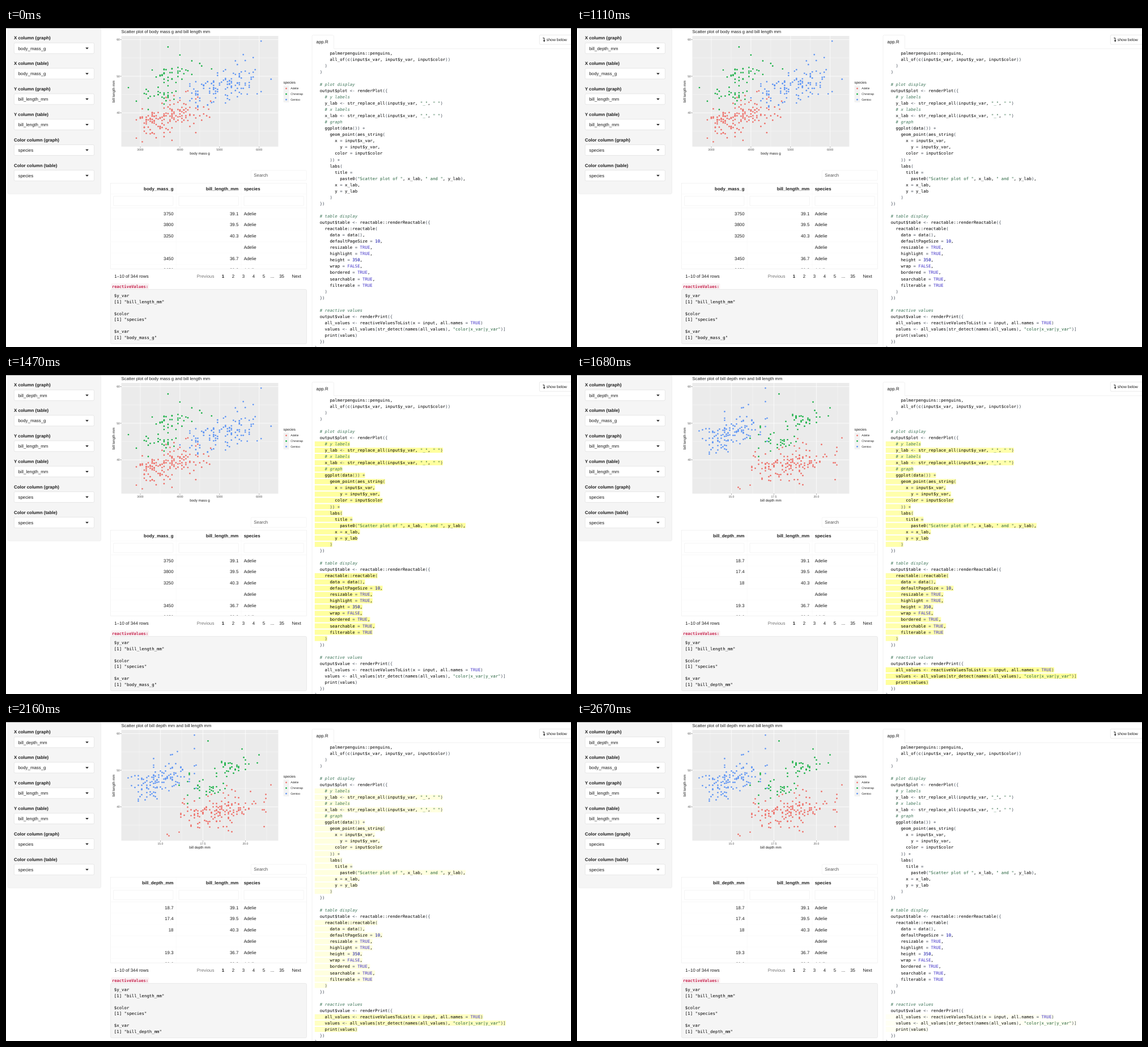
Recreate the animation shown at these times as an HTML page. Size 997 by 562 pixels, loop 2700 ms.

```html
<!DOCTYPE html>
<html lang="en">
<head>
<meta charset="utf-8">
<title>Penguin explorer</title>
<style>
  html, body { margin: 0; width: 100%; height: 100%; overflow: hidden; background: #fff; }
  svg { display: block; text-rendering: geometricPrecision; }
  text { font: 7.87px "Liberation Sans", Arial, sans-serif; fill: #1c1c1c; }
  .bold { font-weight: bold; }
  .mute { fill: #777; }
  .axis { font-size: 6.3px; }
  .tick { font-size: 5.1px; fill: #4d4d4d; }
  .code, .label { font: 7.37px "DejaVu Sans Mono", Menlo, monospace; fill: #000; }
  .label { font-size: 7.1px; font-weight: bold; fill: #c7254e; }
  .comment { fill: #41785c; font-style: italic; }
  .string { fill: #22603a; }
  .literal { fill: #4436c8; }
  .number { fill: #0000a0; }
  .operator { fill: #434c58; }
</style>
</head>
<body>
<svg id="stage" width="997" height="562" viewBox="0 0 997 562"></svg>
<script>
const LOOP = 2700;
const OPEN = 60, CLOSE = 990, UPDATE = 1590;
const FADE = 1440;
const CHAR = 4.437, CODE_X = 544.8, LINE = 11.054;
const SELECT_STEP = 44.86;

const code = `      palmerpenguins::penguins,
      all_of(c(input$x_var, input$y_var, input$color))
    )
  )

  # plot display
  output$plot <- renderPlot({
    # y labels
    y_lab <- str_replace_all(input$y_var, "_", " ")
    # x labels
    x_lab <- str_replace_all(input$x_var, "_", " ")
    # graph
    ggplot(data()) +
      geom_point(aes_string(
        x = input$x_var,
          y = input$y_var,
        color = input$color
      )) +
      labs(
        title =
          paste0("Scatter plot of ", x_lab, " and ", y_lab),
        x = x_lab,
        y = y_lab
      )
  })

  # table display
  output$table <- reactable::renderReactable({
    reactable::reactable(
      data = data(),
      defaultPageSize = 10,
      resizable = TRUE,
      highlight = TRUE,
      height = 350,
      wrap = FALSE,
      bordered = TRUE,
      searchable = TRUE,
      filterable = TRUE
    )
  })

  # reactive values
  output$value <- renderPrint({
    all_values <- reactiveValuesToList(x = input, all.names = TRUE)
    values <- all_values[str_detect(names(all_values), "color|x_var|y_var")]
    print(values)
  })
}`.split("\n");

// Code lines that flash when their output is recomputed
const flashes = [
  { id: "flashPlot", from: 7, to: 23, start: 1260 },
  { id: "flashTable", from: 28, to: 38, start: 1260 },
  { id: "flashValue", from: 43, to: 45, start: 1530 },
];

const views = [
  { id: "before", column: "body_mass_g", title: "body mass g", field: "mass",
    ticks: [3000, 4000, 5000, 6000], minor: [3500, 4500, 5500],
    x: v => 237 + (v - 3000) * 0.0699, format: v => v,
    cells: ["3750", "3800", "3250", "", "3450", "3650"] },
  { id: "after", column: "bill_depth_mm", title: "bill depth mm", field: "depth",
    ticks: [15, 17.5, 20], minor: [13.75, 16.25, 18.75, 21.25],
    x: v => 272.5 + (v - 15) * 30, format: v => v.toFixed(1),
    cells: ["18.7", "17.4", "18", "", "19.3", "20.6"] },
];

// Sexes hold the mean and spread of bill, depth and mass; extremes are [bill, depth, mass].
const species = [
  { name: "Adelie", color: "#ee6e67", count: 137,
    sexes: [[37.3, 2, 17.6, 0.85, 3370, 260], [40.3, 2, 19, 0.9, 4020, 300]],
    extremes: [[32.1, 15.5, 3050], [46, 21.5, 4200], [45.8, 18.9, 4150], [34.6, 21.1, 4400], [33.5, 19, 3600],
      [33.1, 16.1, 2900], [43.2, 19, 4775], [41, 20, 4725], [42.3, 21.2, 4150], [39.2, 21.1, 4150],
      [41.3, 21.1, 4400], [38.6, 21.2, 3800], [39.2, 19.6, 4675], [39.1, 18.7, 3750]] },
  { name: "Chinstrap", color: "#18b045", count: 58,
    sexes: [[46.3, 1.7, 17.5, 0.65, 3520, 200], [50.9, 1.1, 19.1, 0.6, 3880, 260]],
    extremes: [[58, 17.8, 3700], [46.9, 16.6, 2700], [55.8, 19.8, 4000], [54.2, 20.8, 4300], [52.8, 20, 4550],
      [53.5, 19.9, 4500], [52, 20.7, 4800], [43.2, 16.6, 2900], [40.9, 16.6, 3200], [42.4, 17.3, 3600]] },
  { name: "Gentoo", color: "#6096f4", count: 117,
    sexes: [[45.6, 1.9, 14.2, 0.5, 4680, 270], [49.3, 1.9, 15.7, 0.65, 5470, 280]],
    extremes: [[59.6, 17, 6050], [49.2, 15.2, 6300], [55.9, 17, 5600], [54.3, 15.7, 5650], [55.1, 16, 5850],
      [45.2, 14.8, 5950]] },
];

let seed = 11;
const random = () => (seed = (seed * 16807) % 2147483647) / 2147483647;
const normal = () => 2 * (random() + random() + random() - 1.5);
const draw = (mean, sd, step) => Math.round((mean + sd * normal()) / step) * step;
const clamp = v => Math.min(1, Math.max(0, v));

const birds = species.flatMap(({ color, count, sexes, extremes }) => [
  ...extremes.map(([bill, depth, mass]) => ({ bill, depth, mass, color })),
  ...Array.from({ length: count }, (_, i) => {
    const [bill, billSd, depth, depthSd, mass, massSd] = sexes[i % 2];
    return { bill: draw(bill, billSd, 0.1), depth: draw(depth, depthSd, 0.1), mass: draw(mass, massSd, 50), color };
  }),
]);

const text = (x, y, content, cls = "", anchor = "start", extra = "") =>
  `<text x="${x}" y="${y}" class="${cls}" text-anchor="${anchor}" ${extra}>${content}</text>`;
const rect = (x, y, w, h, fill, stroke = "none", r = 0, extra = "") =>
  `<rect x="${x}" y="${y}" width="${w}" height="${h}" rx="${r}" fill="${fill}" stroke="${stroke}" stroke-width=".6" ${extra}/>`;
const path = (d, stroke, width = 0.6, fill = "none") =>
  `<path d="${d}" stroke="${stroke}" stroke-width="${width}" fill="${fill}"/>`;
const dot = (x, y, color) => `<circle cx="${x.toFixed(1)}" cy="${y.toFixed(1)}" r="1.35" fill="${color}"/>`;
const group = (id, content) => `<g id="${id}">${content}</g>`;
const each = (list, build) => list.map(build).join("");

function sidebar() {
  const names = ["X", "Y", "Color"].flatMap(n => [`${n} column (graph)`, `${n} column (table)`]);
  const values = ["", "body_mass_g", "bill_length_mm", "bill_length_mm", "species", "species"];
  return rect(3, 0.5, 164.5, 291.8, "#f5f5f5", "#e8e8e8", 2) + each(names, (name, i) => {
    const y = i * SELECT_STEP;
    return text(14, 20.4 + y, name, "bold")
      + rect(14.3, 26.2 + y, 141.2, 18.8, "#fff", "#dadada", 2)
      + text(21.5, 38.6 + y, values[i], "", "start", i ? "" : 'id="choice"')
      + `<path ${i ? "" : 'id="caret"'} d="M140.2 ${34.4 + y}h5.6l-2.8 3z" fill="#222"/>`;
  });
}

function dropdown() {
  const options = ["bill_length_mm", "bill_depth_mm", "flipper_length_mm", "body_mass_g", "year"];
  return group("glow", rect(14.3, 26.2, 141.2, 18.8, "none", "#7db9ec", 2,
      'style="filter:drop-shadow(0 0 1.5px #a9d2f5)"'))
    + group("menu", rect(14.3, 47, 141.4, 79.2, "#fff", "#d8d8d8", 1.5,
      'style="filter:drop-shadow(0 3px 3px rgba(0,0,0,.18))"')
      + rect(14.6, 0, 140.8, 14.7, "#f5f5f5", "none", 0, 'id="hover"')
      + each(options, (name, i) => text(21.5, 60.1 + i * 14.8, name)));
}

function plot(view) {
  const y = v => 20.5 + (60 - v) * 6.45;
  const vertical = v => `M${view.x(v)} 14V209`;
  const horizontal = v => `M203.5 ${y(v)}H480.5`;
  return text(203.5, 9.4, `Scatter plot of ${view.title} and bill length mm`, "", "start", 'style="font-size:7.65px"')
    + rect(203.5, 14, 277, 195, "#ebebeb")
    + path(each(view.minor, vertical) + each([55, 45, 35], horizontal), "#fff", 0.35)
    + path(each(view.ticks, vertical) + each([60, 50, 40], horizontal), "#fff", 0.75)
    + path(each(view.ticks, v => `M${view.x(v)} 209v1.7`) + each([60, 50, 40], v => `M201.8 ${y(v)}h1.7`), "#444", 0.6)
    + each(view.ticks, v => text(view.x(v), 215.9, view.format(v), "tick", "middle"))
    + each([60, 50, 40], v => text(200.8, y(v) + 1.8, v, "tick", "end"))
    + text(342, 222.8, view.title, "axis", "middle")
    + text(0, 0, "bill length mm", "axis", "middle", 'transform="translate(192.2 112) rotate(-90)"')
    + each(birds, b => dot(view.x(b[view.field]), y(b.bill), b.color));
}

const legend = () => text(489.5, 97.8, "species", "axis") + each(species, (s, i) => {
  const y = 106.6 + i * 9.8;
  return rect(489.6, y - 4.9, 9.8, 9.8, "#f2f2f2") + dot(494.5, y, s.color)
    + text(502.3, y + 1.8, s.name, "tick", "start", 'style="fill:#222"');
});

const rowY = i => 329.5 + i * 19.9;
const cellColumn = (x, values) => each(values, (v, i) => text(x, rowY(i), v, "", "end"));

function table() {
  const pages = [[383, 1], [401, 2], [419, 3], [437, 4], [455, 5], [470, "..."], [486.5, 35]];
  return rect(432.3, 251, 98, 17.3, "#fff", "#eee", 1.5) + text(437.3, 262.4, "Search", "", "start", 'style="fill:#555"')
    + rect(184.6, 273.6, 345.8, 150.8, "none", "#ebebeb")
    + path("M184.6 292.3H530.4M184.6 317H530.4", "#f3f3f3")
    + path(each([1, 2, 3, 4, 5], i => `M184.6 ${317 + i * 19.9}H530.4`) + "M300.2 274V424M415 274V424", "#f8f8f8")
    + each([189.6, 305, 420], x => rect(x, 296.3, 105.3, 16.6, "#fff", "#ebebeb", 1))
    + text(410.3, 285.8, "bill_length_mm", "bold", "end") + text(419.7, 285.8, "species", "bold")
    + `<g clip-path="url(#rows)">` + cellColumn(410.3, ["39.1", "39.5", "40.3", "", "36.7", "39.3"])
    + each([0, 1, 2, 3, 4, 5], i => text(419.7, rowY(i), "Adelie")) + "</g>"
    + text(191.3, 439.6, "1–10 of 344 rows") + text(336.8, 439.6, "Previous", "mute")
    + each(pages, ([x, label]) => text(x, 439.6, label, label === 1 ? "bold" : "", "middle"))
    + text(504.5, 439.6, "Next");
}

function printout() {
  const lines = ["$y_var", '[1] "bill_length_mm"', "", "$color", '[1] "species"', "", "$x_var"];
  return rect(185.5, 450, 67, 10, "#f9f2f4", "none", 1.5) + text(187, 457.6, "reactiveValues:", "label")
    + rect(184.6, 460.6, 345.8, 95.8, "#f5f5f5", "#dedede", 2)
    + each(lines, (line, i) => text(190.8, 474 + i * 10.57, line, "code"));
}

const viewGroup = view => group(view.id, plot(view)
  + text(295.5, 285.8, view.column, "bold", "end")
  + `<g clip-path="url(#rows)">${cellColumn(295.5, view.cells)}</g>`
  + text(190.8, 548, `[1] "${view.column}"`, "code"));

function paint(line) {
  const kinds = ["comment", "string", "literal", "number", "operator"];
  return line.trim().replace(/(#.*)|(".*?")|(TRUE|FALSE)|(\b\d+\b)|([<\-=+(){}\[\]]+)/g, (token, ...parts) =>
    `<tspan class="${kinds[parts.findIndex(Boolean)]}">${token.replace("<", "&lt;")}</tspan>`);
}

function editor() {
  const flash = f => group(f.id, each(code.slice(f.from, f.to + 1), (line, i) =>
    rect(CODE_X, 39.6 + (f.from + i) * LINE, line.length * CHAR, 9, "#ffff99")));
  return path("M540 562V15q0-2.5 2.5-2.5H576q2.5 0 2.5 2.5V36.5H997", "#e8e8e8")
    + text(547.6, 26.8, "app.R")
    + rect(941.3, 12.3, 60, 16.6, "#fff", "#dadada", 2)
    + path("M947.3 17.6h2.4v5.2", "#222", 1) + path("M947.7 21.8h4l-2 2.6z", "none", 0, "#222")
    + text(953.8, 23, "show below", "", "start", 'style="font-size:6.9px"')
    + each(flashes, flash)
    + each(code, (line, i) => text(CODE_X + line.search(/\S|$/) * CHAR, 46.6 + i * LINE, paint(line), "code"));
}

document.getElementById("stage").innerHTML =
  `<clipPath id="rows"><path d="M184 317H531V424H184z"/></clipPath>`
  + sidebar() + table() + printout() + each(views, viewGroup) + legend() + editor() + dropdown()
  + rect(0, 0, 997, 0.6, "#777");

const node = id => document.getElementById(id);
const show = (id, visible) => node(id).setAttribute("visibility", visible ? "visible" : "hidden");

// [time, option under the pointer]
const hovers = [[0, 3], [270, 0], [300, 1], [330, 2], [540, 3], [690, 2], [810, 1]];

function render(t) {
  const open = t >= OPEN && t < CLOSE;
  show("menu", open);
  show("before", t < UPDATE);
  show("after", t >= UPDATE);
  node("choice").textContent = views[t < CLOSE ? 0 : 1].column;
  node("caret").setAttribute("d", open ? "M140.2 37.2h5.6l-2.8-3z" : "M140.2 34.4h5.6l-2.8 3z");
  node("glow").setAttribute("opacity", clamp((t - OPEN) / 60) * clamp((1110 - t) / 120));
  const [, option] = hovers.filter(([start]) => t >= start).pop();
  node("hover").setAttribute("y", 50.1 + option * 14.8);
  for (const { id, start } of flashes) {
    const left = t < start ? 0 : 0.5 + Math.cos(Math.PI * clamp((t - start) / FADE)) / 2;
    node(id).setAttribute("opacity", left);
  }
}

function tick() {
  render(performance.now() % LOOP);
  requestAnimationFrame(tick);
}
tick();
</script>
</body>
</html>
```
